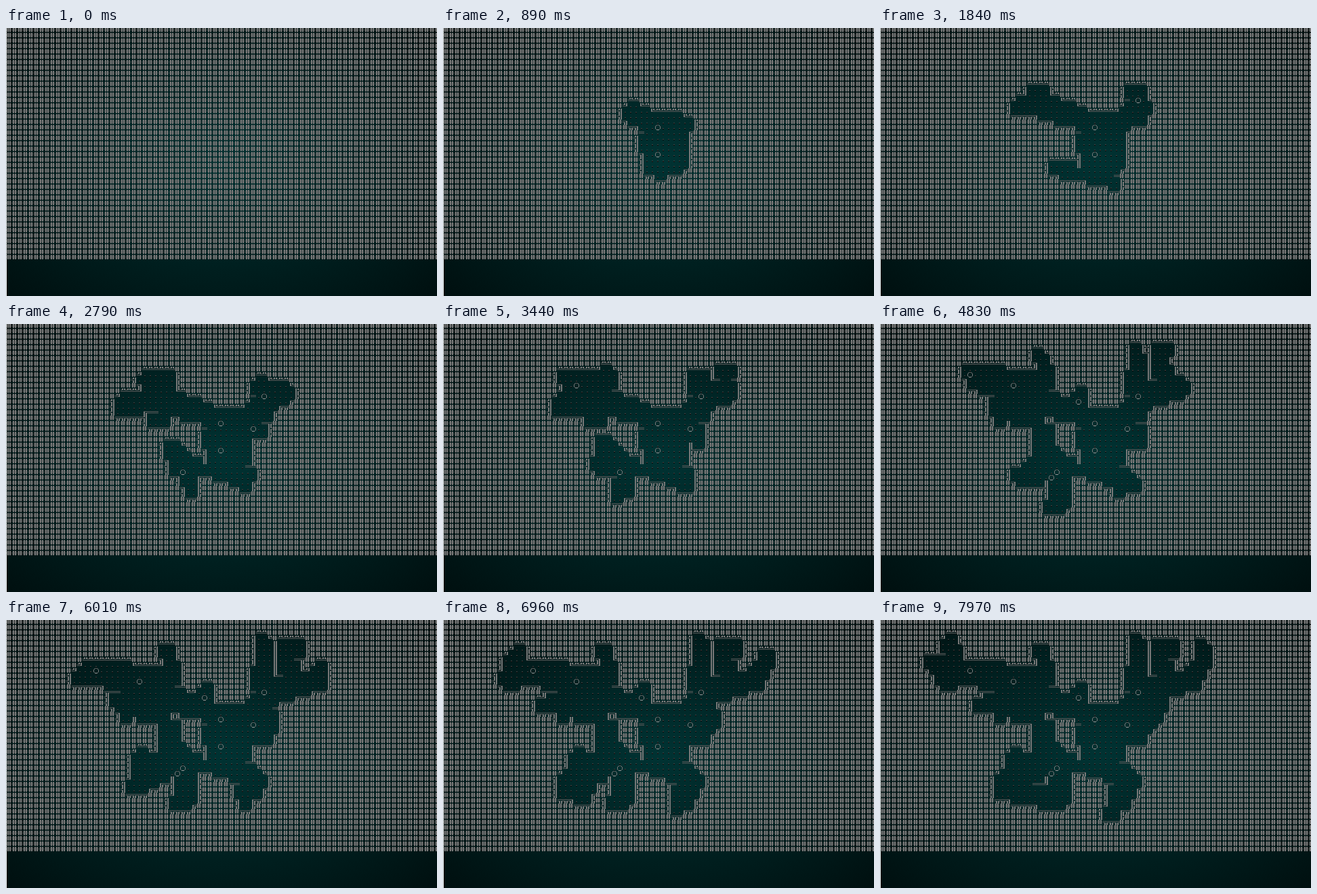
These frames come from a looping animation (636 by 396 pixels, 8 s). An HTML page with a canvas:

```html
<!DOCTYPE html>
<html>
<head>
<meta charset="utf-8">
<style>
  html, body { margin: 0; width: 100%; height: 100%; overflow: hidden; background: #000; }
  canvas { display: block; }
</style>
</head>
<body>
<canvas id="stage" width="636" height="396"></canvas>
<script>
const LOOP = 8000, COLS = 80, ROWS = 43, CELL = 8, LEFT = 1, TOP = -1;
const ctx = document.getElementById('stage').getContext('2d');

let seed = 7;
function random() {
  seed = (seed * 1664525 + 1013904223) >>> 0;
  return seed / 2 ** 32;
}

const opened = new Float64Array(COLS * ROWS).fill(Infinity); // time each cell is carved

function carve(col, row, time) {
  for (const r of [row, row + 1])
    for (const c of [col, col + 1]) {
      const i = r * COLS + c;
      opened[i] = Math.min(opened[i], time);
    }
}

// Digs along a path from start to end, scattering 2x2 brush marks within reach of it.
function grow(start, end, reach, ...path) {
  const span = (end - start) / (path.length - 1);
  const scatter = v => Math.round(v + reach * (2 * random() - 1));
  for (let k = 1; k < path.length; k++) {
    const [c0, r0] = path[k - 1], [c1, r1] = path[k];
    const marks = Math.ceil(Math.hypot(c1 - c0, r1 - r0) * 4 * reach);
    for (let m = 0; m <= marks; m++) {
      const p = m / marks;
      carve(scatter(c0 + (c1 - c0) * p), scatter(r0 + (r1 - r0) * p), start + span * (k - 1 + p));
    }
  }
}

// Centre
grow(60, 800, 2.5, [38, 18], [41, 19], [41, 22], [39, 24]);
grow(1900, 7700, 1.4, [44, 18], [46, 20], [47, 18], [50, 16]);
grow(4100, 4700, 1, [36, 15], [35, 13]);
// North-west
grow(600, 2400, 1, [36, 16], [31, 14], [25, 14], [20, 14]);
grow(1400, 5000, 0.8, [28, 12], [29, 9], [29, 5]);
grow(1700, 7500, 1.4, [29, 11], [23, 10], [17, 9], [12, 9], [12, 4]);
grow(2500, 6800, 1, [28, 16], [22, 16], [18, 14]);
grow(6500, 7400, 1, [12, 11], [9, 7]);
// North-east
grow(850, 2300, 1, [43, 17], [47, 15], [46, 12], [49, 12]);
grow(2300, 7400, 1, [50, 12], [53, 11], [57, 10], [59, 5]);
grow(2700, 5300, 0.8, [46, 10], [46, 7], [47, 4]);
grow(3200, 5600, 1, [51, 9], [50, 4], [53, 4]);
// South
grow(1000, 3900, 1, [36, 26], [31, 25], [29, 22], [29, 19]);
grow(2200, 4800, 1.2, [32, 27], [32, 31], [31, 33]);
grow(3000, 5900, 1.4, [29, 24], [26, 28], [24, 25]);
grow(5000, 7800, 1.4, [25, 28], [22, 30], [29, 32]);
grow(1000, 7700, 1.2, [39, 26], [43, 28], [45, 28], [43, 32], [42, 34]);

const pillars = [[39, 18], [39, 23], [47, 13], [32, 27], [24, 11], [45, 19], [36, 14], [16, 9]];
for (const [c, r] of pillars) opened[r * COLS + c] = Infinity;

// Scanlines: every other row of a glyph is dimmer.
function makeTile(bright, dim, paint) {
  const tile = document.createElement('canvas');
  tile.width = tile.height = CELL;
  const g = tile.getContext('2d');
  g.fillStyle = bright;
  paint(g);
  g.globalCompositeOperation = 'source-atop';
  g.fillStyle = dim;
  for (let y = 0; y < CELL; y += 2) g.fillRect(0, y, CELL, 1);
  return tile;
}
const makeWall = paint => makeTile('#969696', '#575757', paint);

const floor = makeTile('#444', '#050505', g => g.fillRect(3, 5, 2, 2));

const hash = makeWall(g => {
  for (const x of [1, 4]) g.fillRect(x, 0, 2, 7);
  for (const y of [2, 4]) g.fillRect(0, y, 7, 1);
});

const pillar = makeWall(g => {
  for (let y = 0; y < CELL; y++)
    for (let x = 0; x < CELL; x++)
      if (Math.abs(Math.hypot(x - 3.5, y - 3.5) - 3.6) < 0.35) g.fillRect(x, y, 1, 1);
});

// Double-line pieces; bits of the mask: 1 up, 2 right, 4 down, 8 left.
const arms = [[2, 0, 5, 5], [2, 2, 6, 3], [2, 2, 5, 6], [0, 2, 7, 3]];
const grooves = [[4, 0, 1, 4], [4, 3, 4, 1], [4, 3, 1, 5], [0, 3, 5, 1]];
const pieces = Array.from({ length: 16 }, (_, mask) => {
  if (mask === 0) return pillar;
  if (mask === 15) return hash;
  if (mask === 1 || mask === 4) mask = 5;
  if (mask === 2 || mask === 8) mask = 10;
  return makeWall(g => {
    const has = (_, bit) => mask & (1 << bit);
    arms.filter(has).forEach(a => g.fillRect(...a));
    grooves.filter(has).forEach(a => g.clearRect(...a));
  });
});

const glow = ctx.createRadialGradient(0, 0, 0, 0, 0, 1);
glow.addColorStop(0, '#003333');
glow.addColorStop(1, '#000');

function drawBackground() {
  ctx.save();
  ctx.translate(321, 199);
  ctx.scale(640, 400);
  ctx.fillStyle = glow;
  ctx.fillRect(-1, -1, 2, 2);
  ctx.restore();
  ctx.fillStyle = '#fff';
  ctx.fillRect(0, 0, 1, 396);
}

function draw(t) {
  const solid = (c, r) => c < 0 || r < 0 || c >= COLS || r >= ROWS || opened[r * COLS + c] > t;
  drawBackground();
  for (let r = 0; r < ROWS; r++)
    for (let c = 0; c < COLS; c++) {
      const mask = solid(c, r - 1) | solid(c + 1, r) << 1 | solid(c, r + 1) << 2 | solid(c - 1, r) << 3;
      ctx.drawImage(solid(c, r) ? pieces[mask] : floor, LEFT + c * CELL, TOP + r * CELL);
    }
}

const begin = performance.now();
function tick() {
  draw((performance.now() - begin) % LOOP);
  requestAnimationFrame(tick);
}
tick();
</script>
</body>
</html>
```
